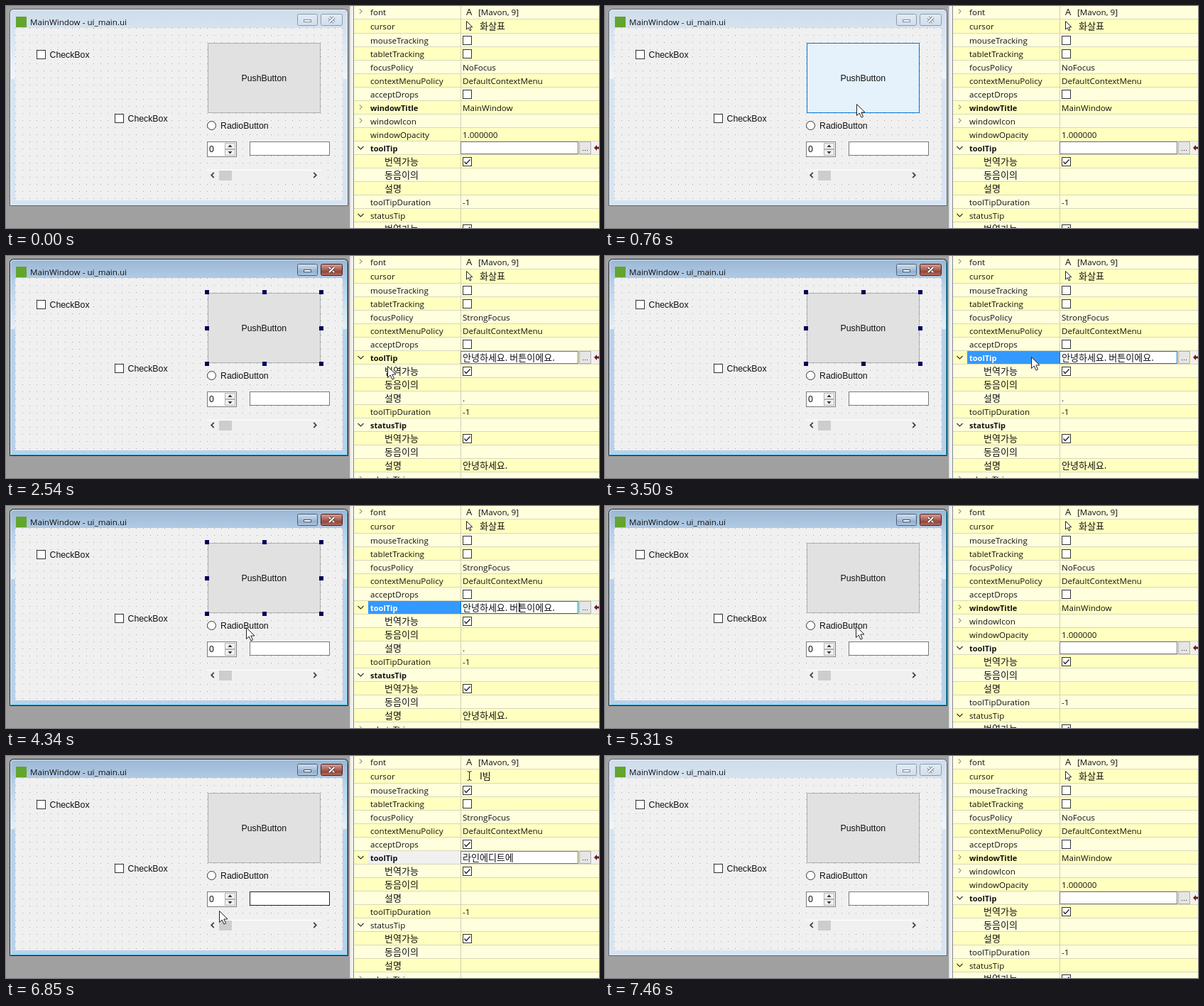
An HTML page with a canvas for the animation above (8 s loop, 835 px wide and 313 px high).

```html
<!DOCTYPE html>
<html lang="ko">
<head>
<meta charset="utf-8">
<style>
html, body { margin: 0; width: 100%; height: 100%; overflow: hidden; }
canvas { display: block; }
</style>
</head>
<body>
<canvas id="stage" width="835" height="313"></canvas>
<script>
const c = document.getElementById('stage').getContext('2d');
const LOOP = 8000;
const UI = '"Open Sans", sans-serif';
const FORM = '"Liberation Sans", sans-serif';
const KOREAN = '"Noto Sans CJK KR", "Noto Sans CJK", sans-serif';
const INK = '#111';

// Pointer tip: time, x, y
const PATH = [
  [200, 632, 302], [420, 520, 238], [640, 392, 160], [780, 348, 134], [900, 336, 131], [1030, 346, 133],
  [1640, 346, 133], [1900, 395, 136], [2400, 517, 146], [2540, 537, 155], [2750, 540, 153],
  [3020, 525, 146], [3220, 525, 146], [3360, 545, 143], [3800, 718, 140], [3980, 722, 142],
  [4050, 700, 144], [4340, 338, 171], [4500, 330, 180], [4830, 350, 178], [5310, 353, 169], [5800, 353, 169],
  [6080, 395, 199], [6300, 390, 200], [6570, 312, 218], [6710, 300, 218], [6850, 300, 218], [7060, 291, 219]
];

const during = (t, from, to) => t >= from && t < to;

function pointerAt(t) {
  if (!during(t, 200, 7460)) return null;
  const i = PATH.findIndex(p => p[0] > t);
  if (i < 0) return PATH[PATH.length - 1].slice(1);
  const [t0, x0, y0] = PATH[i - 1], [t1, x1, y1] = PATH[i];
  const k = (t - t0) / (t1 - t0);
  return [Math.round(x0 + (x1 - x0) * k), Math.round(y0 + (y1 - y0) * k)];
}

function rect(x, y, w, h, fill, stroke) {
  c.fillStyle = fill;
  c.fillRect(x, y, w, h);
  if (stroke) {
    c.strokeStyle = stroke;
    c.lineWidth = 1;
    c.strokeRect(x + .5, y + .5, w - 1, h - 1);
  }
}

function roundBox(x, y, w, h, radius, fill, stroke) {
  c.beginPath();
  c.roundRect(x + .5, y + .5, w - 1, h - 1, radius);
  c.fillStyle = fill;
  c.fill();
  c.strokeStyle = stroke;
  c.lineWidth = 1;
  c.stroke();
}

function fade(y0, y1, ...stops) {
  const g = c.createLinearGradient(0, y0, 0, y1);
  stops.forEach((color, i) => g.addColorStop(i / (stops.length - 1), color));
  return g;
}

function line(points, color = '#333', width = 1) {
  c.strokeStyle = color;
  c.lineWidth = width;
  c.beginPath();
  points.forEach(([x, y]) => c.lineTo(x, y));
  c.stroke();
}

function shape(points, fill, stroke) {
  c.beginPath();
  points.forEach(([x, y]) => c.lineTo(x, y));
  c.closePath();
  c.fillStyle = fill;
  c.fill();
  if (stroke) {
    c.strokeStyle = stroke;
    c.lineWidth = 1;
    c.stroke();
  }
}

function text(s, x, middle, font, color = INK) {
  c.font = font;
  c.fillStyle = color;
  c.fillText(s, x, middle + 4.5);
}

function label(s, x, middle, color, bold) {
  const font = /[가-힣]/.test(s) ? '13px ' + KOREAN : bold ? 'bold 11px ' + UI : '11.6px ' + UI;
  text(s, x, middle, font, color);
}

function checkBox(x, y, checked) {
  rect(x, y, 13, 13, '#fff', '#333');
  if (checked) line([[x + 2.5, y + 6.5], [x + 5, y + 9.5], [x + 10.5, y + 3.5]], '#222', 1.3);
}

// (dx, dy) points from the centre to the tip
function chevron(x, y, dx, dy, color, width = 1.2) {
  line([[x - dx - 2 * dy, y - dy - 2 * dx], [x + dx, y + dy], [x - dx + 2 * dy, y - dy + 2 * dx]], color, width);
}

function arrow(x, y, s = 1) {
  const outline = [[0, 0], [0, 16], [3.7, 12.5], [6.5, 18.6], [9, 17.4], [6.3, 11.6], [11.5, 11.4]];
  shape(outline.map(([a, b]) => [x + .5 + a * s, y + .5 + b * s]), '#fff', '#222');
}

function iBeam(x, y) {
  line([[x - 3, y - 6.5], [x, y - 5.5], [x + 3, y - 6.5]], '#222');
  line([[x, y - 6], [x, y + 6]], '#222');
  line([[x - 3, y + 6.5], [x, y + 5.5], [x + 3, y + 6.5]], '#222');
}

function handles(x, y, w, h) {
  for (const i of [0, 1, 2]) for (const j of [0, 1, 2]) {
    if (i === 1 && j === 1) continue;
    rect(Math.round(x - 4 + i * (w + 1) / 2), Math.round(y - 4 + j * (h + 1) / 2), 6, 6, '#000058');
  }
}

function drawFrame(active) {
  roundBox(5, 4, 477, 278, [5, 5, 0, 0],
    fade(4, 40, active ? '#9ab6d3' : '#cfdcea', active ? '#b9d1ea' : '#d7e4f2'), active ? '#1c2024' : '#5c6670');
  // Shine on both side borders, ending in a hard edge
  const shine = fade(40, 103, 'rgba(255,255,255,0)', 'rgba(255,255,255,.65)');
  rect(6, 40, 7, 63, shine);
  rect(474, 40, 7, 63, shine);
  line([[6.5, 280], [6.5, 9], [10, 5.5], [477, 5.5]], active ? '#dcebf8' : '#edf4fa');
  line([[480.5, 9], [480.5, 280.5], [7, 280.5]], active ? '#24b4da' : '#dfeaf5');
  rect(14, 15, 15, 15, '#63a52d');
  text('MainWindow - ui_main.ui', 34, 22, '11.6px ' + UI, '#111');

  const pale = fade(10, 28, '#e4edf6', '#d0ddeb');
  const edge = active ? '#4c6076' : '#8e9aa8';
  roundBox(410, 11, 29, 17, 2, active ? fade(11, 28, '#d3e1ef', '#b4cae1', '#94b0cd', '#b4cce4') : pale, edge);
  rect(419, 19, 11, 4, '#fff', active ? '#46566a' : '#7c8896');
  roundBox(443, 11, 31, 17, 2, active ? fade(11, 28, '#d3a79f', '#b9776b', '#96463a', '#b8786a') : pale,
    active ? '#4d1f1a' : edge);
  for (const d of [1, -1]) {
    const cross = [[455, 19.5 - 3.5 * d], [462, 19.5 + 3.5 * d]];
    line(cross, active ? '#5c3a36' : '#7c8896', 4);
    line(cross, '#fff', 2.2);
  }

  rect(13, 31, 461, 243, '#f0f0f0');
  c.fillStyle = '#a6a6a6';
  for (let y = 31; y < 274; y += 10) for (let x = 13; x < 474; x += 10) c.fillRect(x, y, 1, 1);
}

function drawForm(t, pointer) {
  const font = '12.3px ' + FORM;
  checkBox(43, 62);
  text('CheckBox', 61.5, 68, font);
  checkBox(153, 152);
  text('CheckBox', 171.5, 158, font);

  const hover = pointer && pointer[0] >= 284 && pointer[0] < 444 && pointer[1] >= 52 && pointer[1] < 152;
  rect(284, 52, 159, 99, hover ? '#e5f1fb' : '#e1e1e1', hover ? '#0078d7' : '#adadad');
  text('PushButton', 331.5, 101, font);

  c.beginPath();
  c.arc(289.5, 168.5, 6, 0, 7);
  c.fillStyle = '#fff';
  c.fill();
  c.strokeStyle = '#333';
  c.lineWidth = 1;
  c.stroke();
  text('RadioButton', 302, 168, font);

  rect(283, 191, 42, 22, '#fff', '#7a7a7a');
  text('0', 286, 201, font);
  for (const [y, d] of [[193, -1], [202, 1]]) {
    rect(308, y, 15, 9, '#f0f0f0', '#b4b4b4');
    shape([[312.5, y + 4.5 - 1.5 * d], [318.5, y + 4.5 - 1.5 * d], [315.5, y + 4.5 + 2 * d]], '#333');
  }
  rect(343, 191, 113, 20, '#fff', during(t, 6150, 7060) ? '#222' : '#7a7a7a');

  rect(283, 231, 161, 16, '#f0f0f0');
  rect(283, 231, 161, 1, '#fff');
  rect(300, 232, 18, 14, '#cdcdcd');
  chevron(291, 238.5, -1.8, 0, '#444', 1.8);
  chevron(435, 238.5, 1.8, 0, '#444', 1.8);

  if (during(t, 830, 4690)) handles(284, 52, 160, 100);
  if (during(t, 5450, 6150)) handles(283, 160, 86, 16);
  if (during(t, 6150, 6640)) handles(344, 192, 112, 19);
}

const PANELS = {
  main: { focus: 'NoFocus', tip: '' },
  button: { focus: 'StrongFocus', tip: '안녕하세요. 버튼이에요.', note: '.', status: '안녕하세요.' },
  radio: { focus: 'StrongFocus', tip: '라디오 버튼이에요.', track: true },
  edit: { focus: 'StrongFocus', tip: '라인에디트에', track: true, drops: true, beam: true }
};

function panelAt(t) {
  if (during(t, 1030, 4970)) return PANELS.button;
  if (during(t, 5600, 6350)) return PANELS.radio;
  if (during(t, 6350, 6920)) return PANELS.edit;
  return PANELS.main;
}

// Each row: name, value (boolean = check box), options
function rowsOf(p) {
  const child = (a, b) => [a, b, { child: true }];
  const texts = note => [child('번역가능', true), child('동음이의', ''), child('설명', note || '')];
  const windowRows = p !== PANELS.main ? [] : [
    ['windowTitle', 'MainWindow', { bold: true, fold: 'closed' }],
    ['windowIcon', '', { fold: 'closed' }],
    ['windowOpacity', '1.000000']
  ];
  return [
    ['font', '[Mavon, 9]', { fold: 'closed', icon: 'font' }],
    ['cursor', p.beam ? 'I빔' : '화살표', { icon: p.beam ? 'beam' : 'arrow' }],
    ['mouseTracking', !!p.track],
    ['tabletTracking', false],
    ['focusPolicy', p.focus],
    ['contextMenuPolicy', 'DefaultContextMenu'],
    ['acceptDrops', !!p.drops],
    ...windowRows,
    ['toolTip', p.tip, { bold: true, fold: 'open', field: true }],
    ...texts(p.note),
    ['toolTipDuration', '-1'],
    ['statusTip', p.status || '', { bold: !!p.status, fold: 'open', hideValue: true }],
    ...texts(p.status),
    ['whatsThis', '', { fold: 'closed' }]
  ];
}

function drawPanel(t) {
  rect(484, 0, 351, 313, '#f0f0f0');
  rect(484, 0, 1, 313, '#d8d8d8');
  rect(489, 0, 1, 313, '#828790');
  const panel = panelAt(t);
  const editing = during(t, 3290, 4970);
  rowsOf(panel).forEach(([name, value, o = {}], i) => {
    const top = i < 2 ? 20 * i - 1 : 39 + 19 * (i - 2);
    const h = i < 2 ? 20 : 19;
    const mid = top + 9;
    if (top >= 313) return;
    rect(490, top, 345, h, i % 2 ? '#ffffbf' : '#ffffdd');
    rect(490, top + h - 1, 345, 1, '#d8d8bc');
    rect(640, top, 1, h, '#d0d0b4');
    const lit = o.field && editing;
    if (lit) rect(510, top, 130, h - 1, '#3399ff');
    else if (o.field && panel.track) rect(510, top, 130, h - 1, '#f0f0f0');
    if (o.fold === 'closed') chevron(499.5, mid - .5, 1.6, 0, '#999');
    if (o.fold === 'open') chevron(499.5, mid, 0, 2, '#333');
    label(name, o.child ? 533 : 513, mid, lit ? '#fff' : INK, o.bold);

    if (o.field) {
      rect(640, top, 166, h - 1, '#fff', editing ? '#0078d7' : '#7a7a7a');
      rect(807, top, 17, h - 1, '#e6e6e6', '#adadad');
      for (const x of [812, 815, 818]) rect(x, mid + 3, 1, 1, '#222');
      rect(825, top, 10, h - 1, '#f0f0f0');
      shape([[828, mid], [832, mid - 4], [832, mid - 1.5], [835, mid - 1.5], [835, mid + 1.5], [832, mid + 1.5], [832, mid + 4]], '#701818');
      if (during(t, 3900, 4700)) rect(722, top + 2, 1, 13, '#000');
    }
    if (typeof value === 'boolean') checkBox(643, mid - 6, value);
    else if (!o.hideValue) label(value, o.icon === 'font' ? 665 : o.icon ? 667 : 643, mid);

    if (o.icon === 'font') text('A', 648, mid, '13px ' + UI);
    if (o.icon === 'arrow') arrow(648, mid - 7, .72);
    if (o.icon === 'beam') iBeam(652.5, mid);
  });
}

function draw(now) {
  const t = now % LOOP;
  const pointer = pointerAt(t);
  rect(0, 0, 835, 313, '#a0a0a0');
  drawFrame(during(t, 780, 7460));
  drawForm(t, pointer);
  drawPanel(t);
  if (pointer) {
    const [x, y] = pointer;
    if (during(x, 641, 806) && during(y, 133, 152)) iBeam(x + .5, y);
    else arrow(x, y);
  }
  requestAnimationFrame(draw);
}
requestAnimationFrame(draw);
</script>
</body>
</html>
```
